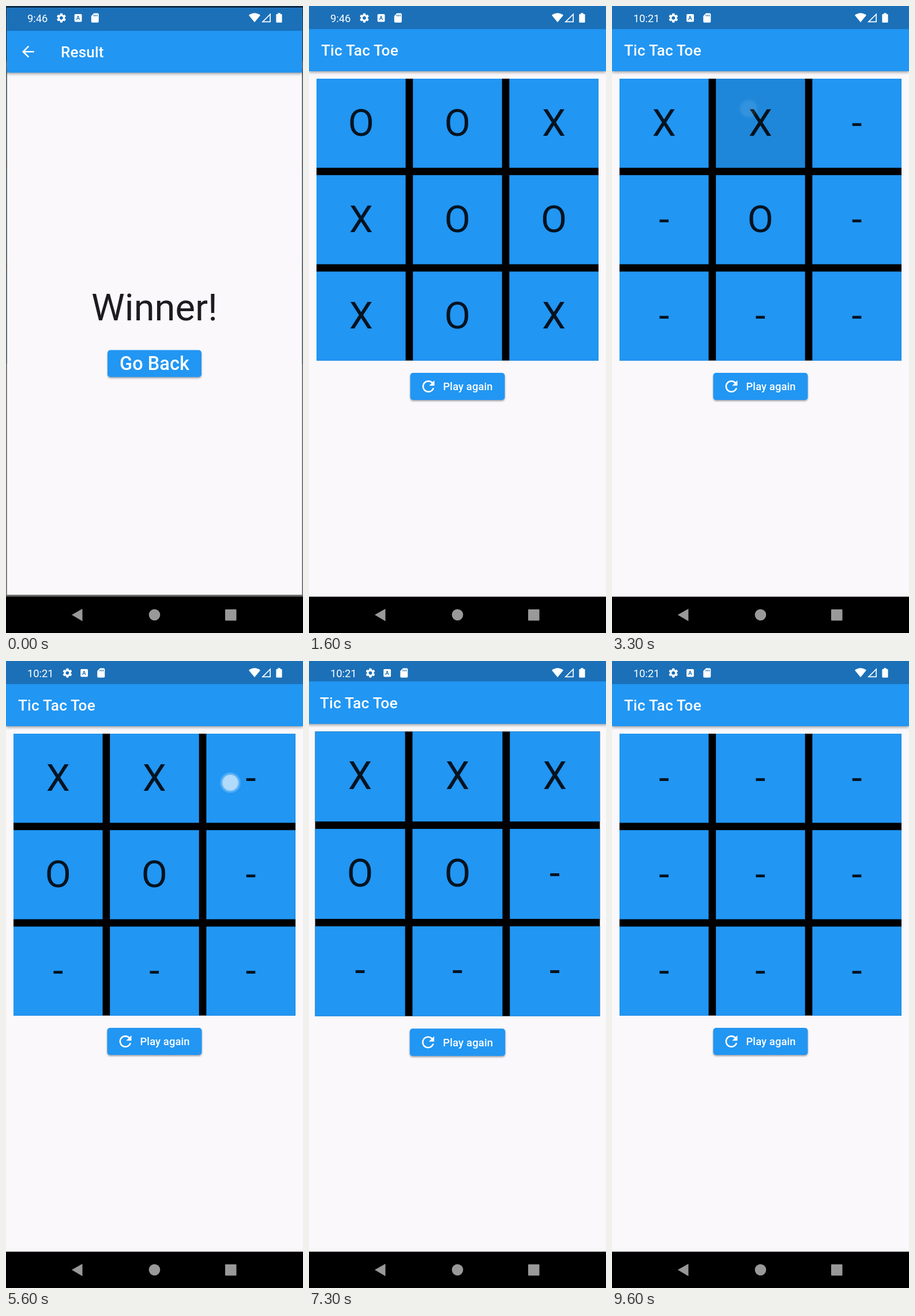
Write an HTML page that moves like this. It is 515 by 1087 pixels and loops after 9700 ms.

```html
<!DOCTYPE html>
<html lang="en">
<head>
<meta charset="utf-8">
<title>Tic Tac Toe</title>
<style>
  html, body { margin: 0; width: 100%; height: 100%; overflow: hidden; background: #000; }
  svg { display: block; width: 100vw; height: 100vh; font-family: Roboto, sans-serif; }
  .bar { fill: #2196f3; filter: drop-shadow(0 2px 2.5px rgba(0,0,0,.38)); }
  .button { fill: #2196f3; filter: drop-shadow(0 2px 1.5px rgba(0,0,0,.35)); }
  .label { fill: #fff; font-weight: 500; }
  .title { font-size: 26.2px; letter-spacing: .2px; }
  .mark { fill: #000; fill-opacity: .87; font-size: 65.5px; text-anchor: middle; }
</style>
</head>
<body>
<svg viewBox="0 0 515 1087">
  <g id="board">
    <rect width="515" height="1024" fill="#faf8fb"/>
    <rect class="bar" width="515" height="113"/>
    <rect width="515" height="40" fill="#1b70b8"/>
    <text class="label title" x="21" y="86">Tic Tac Toe</text>
    <rect x="13" y="126" width="489" height="488.7"/>
    <g id="cells"></g>
    <rect class="button" x="175.5" y="636" width="164" height="47" rx="5"/>
    <path fill="#fff" transform="translate(191.3 643.8) scale(1.31)" d="M17.65 6.35C16.2 4.9 14.21 4 12 4c-4.42 0-7.99 3.58-7.99 8s3.57 8 7.99 8c3.73 0 6.84-2.55 7.73-6h-2.08c-.82 2.33-3.04 4-5.65 4-3.31 0-6-2.69-6-6s2.69-6 6-6c1.66 0 3.14.69 4.22 1.78L13 11h7V4l-2.35 2.35z"/>
    <text class="label" x="232.5" y="666" font-size="18.35" letter-spacing=".13">Play again</text>
  </g>
  <rect id="scrim" width="515" height="1024"/>
  <g id="result">
    <rect width="515" height="1024" fill="#faf8fb"/>
    <rect class="bar" width="515" height="113"/>
    <rect width="515" height="40" fill="#1b70b8"/>
    <path fill="#fff" transform="translate(21.2 60.7) scale(1.31)" d="M20 11H7.83l5.59-5.59L12 4l-8 8 8 8 1.41-1.41L7.83 13H20v-2z"/>
    <text class="label title" x="94" y="86">Result</text>
    <text x="257.5" y="545" font-size="65.5" fill="#1d1b20" text-anchor="middle">Winner!</text>
    <rect class="button" x="175.5" y="597" width="164" height="47" rx="5"/>
    <text class="label" x="257.5" y="632" font-size="32.7" text-anchor="middle">Go Back</text>
  </g>
  <g fill="#fff">
    <text id="clock" x="37" y="28" font-size="18.35"></text>
    <g id="notices">
      <path transform="translate(86 10.7) scale(.83)" d="M19.14 12.94c.04-.3.06-.61.06-.94 0-.32-.02-.64-.07-.94l2.03-1.58c.18-.14.23-.41.12-.61l-1.92-3.32c-.12-.22-.37-.29-.59-.22l-2.39.96c-.5-.38-1.03-.7-1.62-.94l-.36-2.54c-.04-.24-.24-.41-.48-.41h-3.84c-.24 0-.43.17-.47.41l-.36 2.54c-.59.24-1.13.57-1.62.94l-2.39-.96c-.22-.08-.47 0-.59.22L2.74 8.87c-.12.21-.08.47.12.61l2.03 1.58c-.05.3-.09.63-.09.94s.02.64.07.94l-2.03 1.58c-.18.14-.23.41-.12.61l1.92 3.32c.12.22.37.29.59.22l2.39-.96c.5.38 1.03.7 1.62.94l.36 2.54c.05.24.24.41.48.41h3.84c.24 0 .44-.17.47-.41l.36-2.54c.59-.24 1.13-.56 1.62-.94l2.39.96c.22.08.47 0 .59-.22l1.92-3.32c.12-.22.07-.47-.12-.61l-2.01-1.58zM12 15.6c-1.98 0-3.6-1.62-3.6-3.6s1.62-3.6 3.6-3.6 3.6 1.62 3.6 3.6-1.62 3.6-3.6 3.6z"/>
      <rect x="118.7" y="14" width="12.8" height="13.5" rx="1.8"/>
      <text x="125" y="24.3" font-size="9.5" font-weight="700" text-anchor="middle" fill="#1b70b8">A</text>
      <path d="M152.5 12.5H159a1.8 1.8 0 0 1 1.8 1.8V27a1.8 1.8 0 0 1-1.8 1.8H149.6a1.8 1.8 0 0 1-1.8-1.8V17.3z"/>
      <path d="M152.6 15v3M155.3 15v3M158 15v3" stroke="#1b70b8" stroke-width="1.2"/>
    </g>
    <path d="M421 16Q431 8.5 441 16L431 28.3z"/>
    <path d="M445 27.4L458.2 14.2V27.4z" fill="none" stroke="#fff" stroke-width="1.7"/>
    <path d="M471.3 12.2h4.4v1.7h1.7a1.2 1.2 0 0 1 1.2 1.2V27.5a1.3 1.3 0 0 1-1.3 1.3h-7.6a1.3 1.3 0 0 1-1.3-1.3V15.1a1.2 1.2 0 0 1 1.2-1.2h1.7z"/>
  </g>
  <rect y="1024" width="515" height="63"/>
  <g fill="#999">
    <path d="M114 1055.5L132.5 1045V1066.500z"/>
    <circle cx="257.5" cy="1055.5" r="9.8"/>
    <rect x="380" y="1046" width="19.5" height="19.5" rx="1"/>
  </g>
  <g id="touch" fill="#fff">
    <circle r="18" opacity=".16"/>
    <circle r="16" opacity=".16"/>
    <circle r="13.7" opacity=".5"/>
  </g>
</svg>
<script>
const LOOP = 9700, ROUTE = 300, SECOND_GAME = 1700, RESET = 8650;
const $ = id => document.getElementById(id);
const clamp = v => Math.min(1, Math.max(0, v));
const ramp = (v, from, to) => clamp((v - from) / (to - from));

const oldGame = [..."OOXXOOXOX"];
// Taps on a cell place their mark on release
const touches = [
  { from: 1000, to: 1140, x: 258, y: 622 },
  { from: 2000, to: 2140, x: 82, y: 190, cell: 0, mark: "X" },
  { from: 2500, to: 2640, x: 245, y: 360, cell: 4, mark: "O" },
  { from: 3040, to: 3180, x: 237, y: 178, cell: 1, mark: "X" },
  { from: 5000, to: 5140, x: 82, y: 362, cell: 3, mark: "O" },
  { from: 5500, to: 5650, x: 389, y: 211, cell: 2, mark: "X" },
  { from: 7000, to: 7140, x: 258, y: 622 },
  { from: 8500, to: RESET, x: 250, y: 662 }
];
const moves = touches.filter(touch => touch.mark);
const routes = [
  { at: -170, push: true },
  { at: 1160, push: false },
  { at: 5670, push: true },
  { at: 7160, push: false }
];

function add(parent, tag, attrs) {
  const node = document.createElementNS("http://www.w3.org/2000/svg", tag);
  for (const key in attrs) node.setAttribute(key, attrs[key]);
  return parent.appendChild(node);
}

const cells = Array.from({ length: 9 }, (_, i) => {
  const x = 13 + i % 3 * 167.2, y = 126 + Math.floor(i / 3) * 167.2;
  const box = { x, y, width: 154.5, height: 154.5 };
  add($("cells"), "rect", { ...box, fill: "#2196f3" });
  const ink = add($("cells"), "rect", { ...box, fill: "#000" });
  const mark = add($("cells"), "text", { class: "mark", x: x + 77.2, y: Math.round(y + 98.9) });
  return { ink, mark };
});

// Quick start followed by a long settle
const zoomEase = p => p < 1 / 6 ? .4 * (6 * p) ** 2 : 1 - .6 * (1 - (p - 1 / 6) * 1.2) ** 4;

function place(page, scale, opacity = 1) {
  page.setAttribute("transform", `translate(257.5 512) scale(${scale}) translate(-257.5 -512)`);
  page.setAttribute("opacity", opacity);
}

function drawPages(t) {
  const { at, push } = routes.filter(r => r.at <= t).pop();
  const p = clamp((t - at) / ROUTE), e = zoomEase(p);
  if (push) {
    place($("board"), 1 + .05 * e);
    place($("result"), .85 + .15 * e, ramp(p, .125, .25));
  } else {
    place($("board"), 1.1 - .1 * e);
    place($("result"), 1 - .1 * e, 1 - ramp(p, .0825, .2075));
  }
  $("scrim").setAttribute("opacity", push ? .6 * ramp(p, .2075, .4175) : 0);
}

function drawBoard(t) {
  const marks = t < SECOND_GAME ? [...oldGame] : Array(9).fill("-");
  const inks = Array(9).fill(0);
  for (const { to, cell, mark } of moves) {
    if (t >= to && t < RESET) marks[cell] = mark;
    inks[cell] = .1 * ramp(t, to - 40, to + 20) * (1 - ramp(t, to + 140, to + 300));
  }
  cells.forEach((cell, i) => {
    if (cell.mark.textContent !== marks[i]) cell.mark.textContent = marks[i];
    cell.ink.setAttribute("opacity", inks[i]);
  });
}

function drawTouch(t) {
  const touch = touches.find(s => t >= s.from && t < s.to + 140);
  $("touch").setAttribute("opacity", touch ? 1 - ramp(t, touch.to, touch.to + 140) : 0);
  if (touch) $("touch").setAttribute("transform", `translate(${touch.x} ${touch.y})`);
}

function draw(t) {
  const first = t < SECOND_GAME;
  $("clock").textContent = first ? "9:46" : "10:21";
  $("notices").setAttribute("transform", `translate(${first ? 0 : 10.5} 0)`);
  drawBoard(t);
  drawPages(t);
  drawTouch(t);
}

const start = performance.now();
function tick() {
  draw((performance.now() - start) % LOOP);
  requestAnimationFrame(tick);
}
tick();
</script>
</body>
</html>
```
